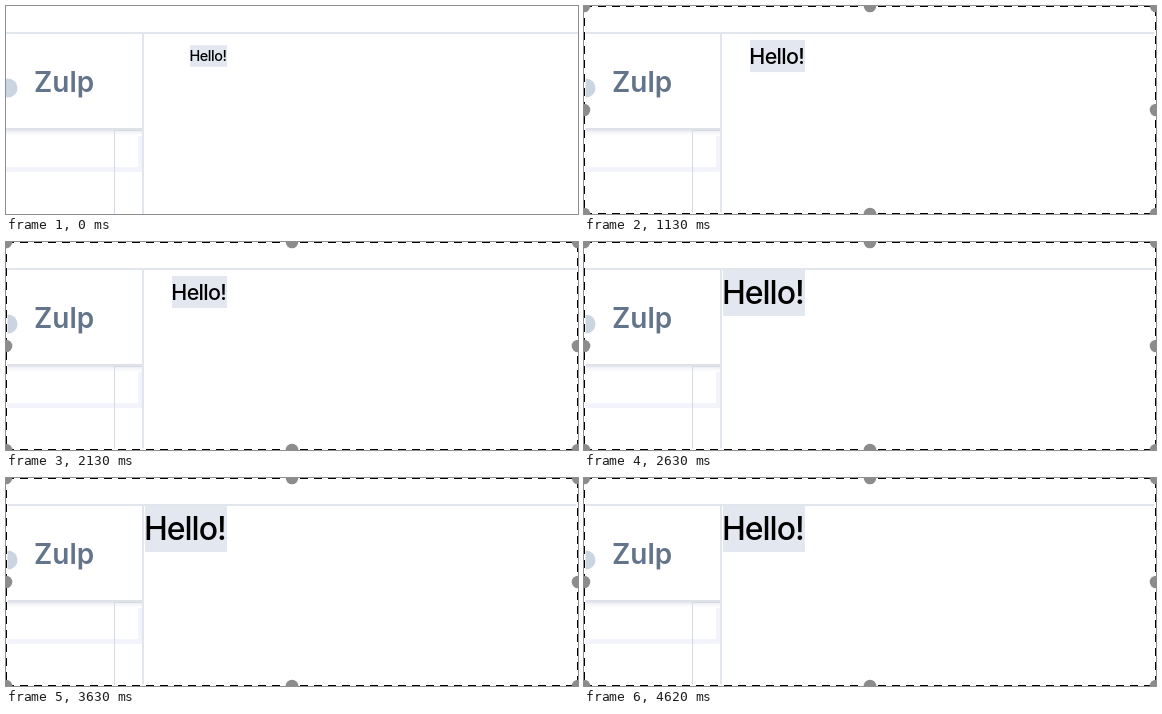
Recreate the animation shown at these times as an HTML page. Size 572 by 208 pixels, loop 4860 ms.

```html
<!DOCTYPE html>
<html lang="en">
<head>
<meta charset="utf-8">
<title>Pulsing greeting</title>
<style>
  html, body { margin: 0; width: 100%; height: 100%; overflow: hidden; background: #fff; }
  svg { display: block; width: 572px; height: 208px; }
  text { font-family: Inter, "Open Sans", sans-serif; }
  .brand { font-size: 28px; font-weight: 600; fill: #64748b; }
  .hello { font-size: 32px; font-weight: 500; letter-spacing: -0.032em; fill: #000; }
  .line { fill: #e1e5ec; }
  .thin { fill: #d6dae3; }
  .pale { fill: #f2f3fb; }
  .handles { fill: #8c8c8c; }
</style>
</head>
<body>
<svg viewBox="0 0 572 208">
  <defs>
    <linearGradient id="shade" x2="0" y2="1">
      <stop offset="0" stop-color="#dcdfe7"/>
      <stop offset="0.25" stop-color="#e2e4eb"/>
      <stop offset="0.5" stop-color="#f3f4f7"/>
      <stop offset="1" stop-color="#fff"/>
    </linearGradient>
    <clipPath id="panel"><rect x="138" y="28" width="434" height="180"/></clipPath>
  </defs>

  <rect class="pale" y="161" width="136" height="5"/>
  <rect class="pale" x="132" y="125" width="4" height="41"/>
  <rect y="122" width="136" height="8" fill="url(#shade)"/>
  <rect class="thin" x="108" y="124" width="28" height="1"/>
  <rect class="thin" x="108" y="124" width="1" height="84"/>
  <rect class="line" y="26" width="572" height="2"/>
  <rect class="line" x="136" y="28" width="2" height="180"/>
  <circle cx="2" cy="82" r="9.5" fill="#cbd5e1"/>
  <text class="brand" x="28" y="86">Zulp</text>

  <g clip-path="url(#panel)">
    <g id="greeting">
      <rect x="-82" y="-24" width="82" height="48" fill="#e2e7f0"/>
      <text class="hello" x="-83" y="12">Hello!</text>
    </g>
  </g>

  <g id="selection" visibility="hidden">
    <rect width="572" height="208" fill="none" stroke="#fff" stroke-width="3"/>
    <rect width="572" height="208" fill="none" stroke="#000" stroke-width="2" stroke-dasharray="8 6"/>
    <g class="handles">
      <circle r="6.3"/><circle cx="286" r="6.3"/><circle cx="572" r="6.3"/>
      <circle cy="104" r="6.3"/><circle cx="572" cy="104" r="6.3"/>
      <circle cy="208" r="6.3"/><circle cx="286" cy="208" r="6.3"/><circle cx="572" cy="208" r="6.3"/>
    </g>
  </g>
</svg>
<script>
  const LOOP = 4860;
  const LAST_CHANGE = 4620;
  const FULL_WIDTH = 82;
  const SELECT_STEP = 8;
  const widths = [37, 55, 68, 75, 80, 82, 70, 49]; // one pulse per second
  const greeting = document.getElementById('greeting');
  const selection = document.getElementById('selection');

  // Steps of 125 ms on a 10 ms clock, then a hold and one final change.
  function stepAt(time) {
    if (time >= LAST_CHANGE) return 37;
    return Math.min(35, Math.floor(Math.floor(time / 10) / 12.5));
  }

  function draw(now) {
    const step = stepAt(now % LOOP);
    const scale = widths[step % widths.length] / FULL_WIDTH;
    greeting.setAttribute('transform', `translate(221 50) scale(${scale})`);
    selection.setAttribute('visibility', step >= SELECT_STEP ? 'visible' : 'hidden');
  }

  const start = performance.now();
  function tick() {
    draw(performance.now() - start);
    requestAnimationFrame(tick);
  }
  tick();
</script>
</body>
</html>
```
